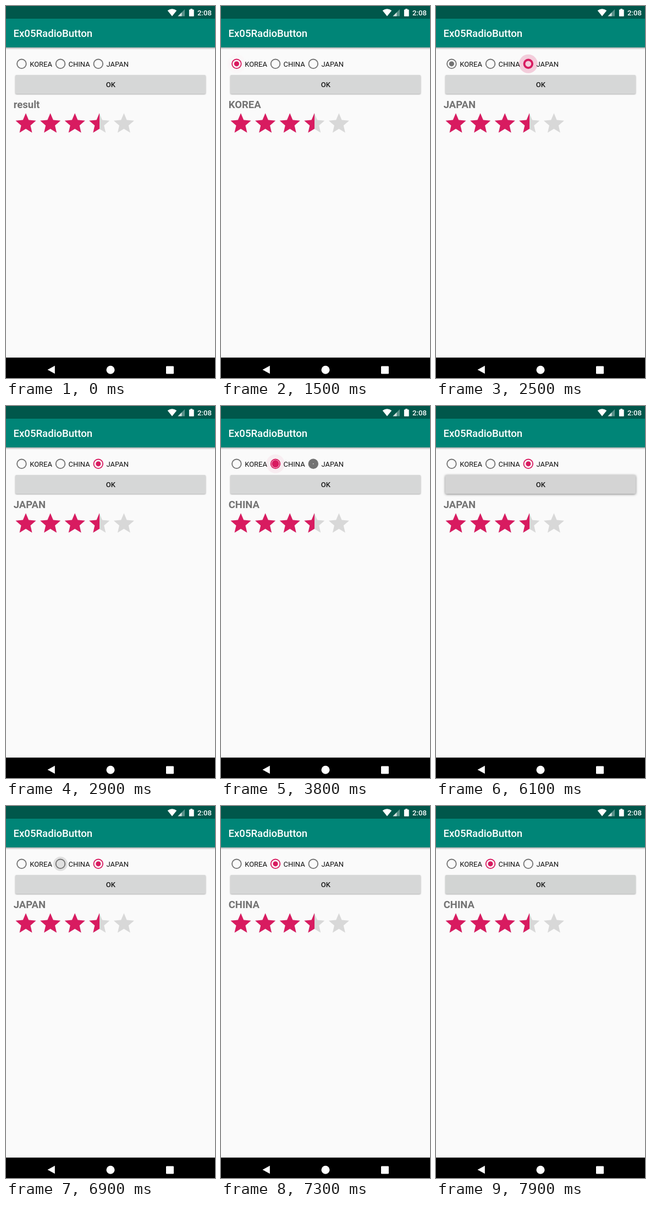
An HTML page that plays this animation: 380 by 674 pixels, repeating every 8 s.

```html
<!DOCTYPE html>
<html lang="en">
<head>
<meta charset="utf-8">
<title>Radio buttons</title>
<style>
  html, body { margin: 0; width: 100%; height: 100%; overflow: hidden; background: #fafafa; }
  svg { display: block; width: 380px; height: 674px; font: 13px Roboto, sans-serif; }
  .medium { font-weight: 500; }
  #button { fill: #d6d7d7; filter: drop-shadow(0 1px 1px rgba(0, 0, 0, .32)); }
  #button.raised { fill: #d4d4d4; filter: drop-shadow(0 1.5px 2px rgba(0, 0, 0, .5)); }
  #button.tint { fill: #d2d4d3; }
  #result { font-size: 18.5px; font-weight: 700; fill: #737373; }
</style>
</head>
<body>
<svg viewBox="0 0 380 674">
  <defs>
    <linearGradient id="shade" x2="0" y2="1">
      <stop stop-color="#000" stop-opacity=".3"/>
      <stop offset="1" stop-color="#000" stop-opacity="0"/>
    </linearGradient>
    <path id="star" d="M12 17.27 18.18 21l-1.64-7.03L22 9.24l-7.19-.61L12 2 9.19 8.63 2 9.24l5.46 4.73L5.82 21z"/>
    <clipPath id="rated"><rect x="0" y="190" width="170" height="45"/></clipPath>
  </defs>

  <rect width="380" height="674" fill="#fafafa"/>
  <rect y="75" width="380" height="4" fill="url(#shade)"/>
  <rect y="22" width="380" height="53" fill="#008577"/>
  <rect width="380" height="23" fill="#00574b"/>

  <g fill="#fff">
    <path d="M302 18.5 293.7 8.2Q302 2.3 310.3 8.2z"/>
    <path d="M325 6V18.5H312.5z" opacity=".35"/>
    <path d="M319.5 11.5V18.5H312.5z" opacity=".75"/>
    <path d="M335.3 5h3.6v1.5h2.4q.4 0 .4.4v11.2q0 .6-.6.6h-7.6q-.6 0-.6-.6V6.9q0-.4.4-.4h2z"/>
    <text class="medium" x="374" y="17" text-anchor="end" font-size="13.2">2:08</text>
    <text class="medium" x="13.5" y="56" font-size="18.6">Ex05RadioButton</text>
  </g>

  <g id="radios"></g>

  <rect id="button" x="17" y="125" width="346" height="34" rx="2"/>
  <text class="medium" x="190.3" y="147" text-anchor="middle" fill="#1c1c1c">OK</text>
  <text id="result" x="13.7" y="184.5">result</text>
  <g id="empty" fill="#d8d8d8"></g>
  <g id="full" fill="#d81b60" clip-path="url(#rated)"></g>

  <rect y="637" width="380" height="37" fill="#000"/>
  <g fill="#fff">
    <path d="M75.5 659 88.8 651.7V666.3z"/>
    <circle cx="190" cy="659.3" r="7.5"/>
    <rect x="291" y="652.5" width="14" height="14" rx="1.2"/>
  </g>
</svg>
<script>
  const LOOP = 8000, TICK = 100, R = 9.25, HOLE = 7.4, DOT = 4.6;
  const PINK = '#d81b60', GREY = '#737373';
  const $ = id => document.getElementById(id);

  function add(parent, tag, attrs) {
    const el = document.createElementNS('http://www.w3.org/2000/svg', tag);
    set(el, attrs);
    return parent.appendChild(el);
  }
  function set(el, attrs) {
    for (const k in attrs) el.setAttribute(k, attrs[k]);
  }

  for (let i = 0; i < 5; i++) {
    const transform = `translate(${13.8 + 44.6 * i} 190.6) scale(1.85)`;
    for (const id of ['empty', 'full']) add($(id), 'use', { href: '#star', transform });
  }

  const radios = [['KOREA', 28.4, 43.2], ['CHINA', 99, 113.5], ['JAPAN', 167.8, 182.4]].map(([name, cx, x]) => {
    const disc = attrs => add($('radios'), 'circle', { cx, cy: 104.8, ...attrs });
    const halo = disc({ r: 17 }), ring = disc({ fill: 'none' }), dot = disc({});
    add($('radios'), 'text', { x, y: 109.5, fill: '#111' }).textContent = name;
    return { name, halo, ring, dot };
  });

  // Per tick of a tap: [hole radius, dot radius]; the choice changes at step 2
  const OFF = [HOLE, 0], ON = [HOLE, DOT];
  const CHECK = [OFF, OFF, [5.4, 0], [HOLE, 6.7], [HOLE, 5.2], ON];
  const UNCHECK = [ON, ON, ON, [.8, 0], [5, 0], OFF];
  const HALO = [[8, .06], [13, .1], [17, .2], [17, .055], [17, .03], [17, .012]];

  // [time, radio, step at each tick]
  const TAPS = [
    [1300, 0, [2, 4, 5, 5, 6]],
    [2300, 2, [0, 1, 2, 3, 4, 5, 6]],
    [3500, 1, [0, 1, 2, 3, 4, 6]],
    [4400, 0, [0, 1, 2, 3, 4, 6]],
    [5400, 2, [0, 1, 2, 3, 4, 6]],
    [6900, 1, [1, 2, 3, 4, 6]]
  ];
  const BUTTON = [[0, ''], [6100, 'raised'], [6200, ''], [7500, 'raised'], [7600, ''], [7900, 'tint']];

  function paint(radio, [hole, dot], color, [r, alpha], haloColor) {
    set(radio.ring, { r: (R + hole) / 2, 'stroke-width': R - hole, stroke: color });
    set(radio.dot, { r: dot, fill: color });
    set(radio.halo, { r, fill: haloColor, opacity: alpha });
  }

  function draw(t) {
    const n = TAPS.filter(tap => tap[0] <= t).length - 1;
    const [start, next, steps] = TAPS[n] || [0, -1, [6]];
    const prev = n > 0 ? TAPS[n - 1][1] : -1;
    const step = steps[Math.min((t - start) / TICK, steps.length - 1)];
    const pose = Math.min(step, 5), changed = step >= 2;

    radios.forEach((radio, i) => {
      if (i === next) {
        const color = changed ? PINK : GREY;
        paint(radio, CHECK[pose], color, HALO[step] || [17, 0], changed ? PINK : '#000');
      } else if (i === prev) {
        paint(radio, UNCHECK[pose], changed ? GREY : PINK, [17, 0], PINK);
      } else {
        paint(radio, OFF, GREY, [17, 0], PINK);
      }
    });
    const chosen = radios[changed ? next : prev];
    $('result').textContent = chosen ? chosen.name : 'result';
    $('button').setAttribute('class', BUTTON.filter(b => b[0] <= t).pop()[1]);
  }

  const begin = performance.now();
  let last = -1;
  function frame() {
    const t = Math.floor((performance.now() - begin) % LOOP / TICK) * TICK;
    if (t !== last) draw(last = t);
    requestAnimationFrame(frame);
  }
  frame();
</script>
</body>
</html>
```
